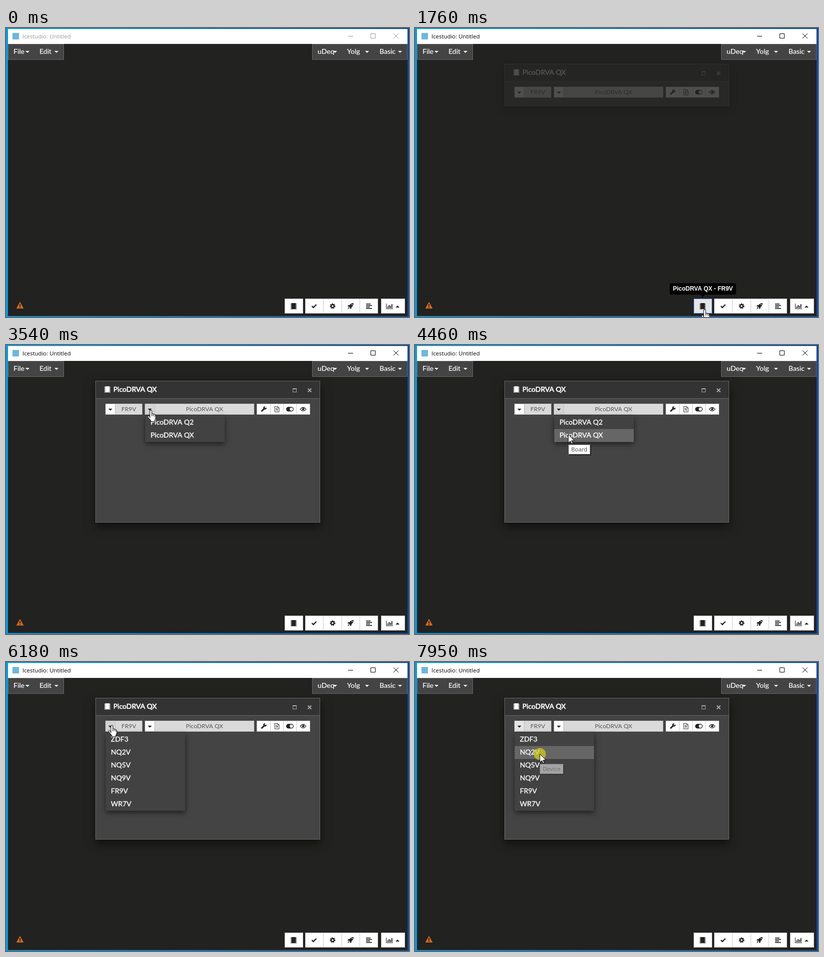
Write an HTML page with a canvas that moves like this. It is 807 px wide and 581 px high and loops after 8000 ms.

```html
<!DOCTYPE html>
<html lang="en">
<head>
<meta charset="utf-8">
<title>Icestudio</title>
<style>
html, body { margin: 0; width: 100%; height: 100%; overflow: hidden; background: #222; }
canvas { display: block; }
</style>
</head>
<body>
<canvas id="stage" width="807" height="581"></canvas>
<script>
const LOOP = 8000, STEP = 77.3, START = 440;
const BOARD = 'PicoDRVA QX', DEVICE = 'FR9V';
const BOARDS = ['PicoDRVA Q2', BOARD];
const DEVICES = ['ZDF3', 'NQ2V', 'NQ5V', 'NQ9V', DEVICE, 'WR7V'];
const LATO = 'Lato, sans-serif', UI = '"Open Sans", sans-serif';

const screen = document.getElementById('stage').getContext('2d');
const layerCanvas = document.createElement('canvas');
layerCanvas.width = 807;
layerCanvas.height = 581;
const layer = layerCanvas.getContext('2d');
let c = screen;

// Pointer stops: time, x, y
const STOPS = [
  [440, 703, 284], [1210, 580, 566], [2150, 580, 566], [2990, 290, 122],
  [3070, 290, 122], [3220, 290, 131], [3850, 290, 131], [4230, 307, 180],
  [5320, 307, 180], [5390, 303, 165], [5790, 212, 127], [6190, 212, 127],
  [6870, 245, 221], [7110, 245, 221], [7640, 250, 185]
];
const HAND = new Path2D('M-2 15V2Q-2 0 0 0T2 2V7.5Q3.5 6.5 5 8Q7 7.5 8 9Q10 9 10 11V15Q10 17 8 20V23H0V21Q-3 17.5-6 13.5Q-7 11-5 11Q-3.5 11-2 13.5Z');
const KNUCKLES = new Path2D('M2 8V12M5 8.5V12M8 10V13');
const ARROW = new Path2D('M0 0V17L4 13.2 6.6 19 9 18 6.4 12.3H12Z');

const within = (t, a, b) => t >= a && t < b;
const clamp = v => Math.max(0, Math.min(1, v));

function box(x, y, w, h, fill, stroke) {
  c.fillStyle = fill;
  c.fillRect(x, y, w, h);
  if (stroke) {
    c.strokeStyle = stroke;
    c.lineWidth = 1;
    c.strokeRect(x + .5, y + .5, w - 1, h - 1);
  }
}

function shadowBox(x, y, w, h, fill, blur, drop) {
  c.save();
  c.shadowColor = 'rgba(0,0,0,.55)';
  c.shadowBlur = blur;
  c.shadowOffsetY = drop;
  box(x, y, w, h, fill);
  c.restore();
}

function text(str, x, y, font, color, { align = 'left', weight = 0 } = {}) {
  c.font = font;
  c.textAlign = align;
  c.fillStyle = c.strokeStyle = color;
  c.fillText(str, x, y);
  if (weight) {
    c.lineWidth = weight;
    c.strokeText(str, x, y);
  }
}

function poly(color, ...p) {
  c.fillStyle = color;
  c.beginPath();
  for (let i = 0; i < p.length; i += 2) c.lineTo(p[i], p[i + 1]);
  c.fill();
}

function caret(x, y, color, dir = 1) {
  poly(color, x - 4, y - 2 * dir, x + 4, y - 2 * dir, x, y + 2 * dir);
}

function line(d, color, width = 1) {
  c.strokeStyle = color;
  c.lineWidth = width;
  c.stroke(new Path2D(d));
}

function disc(x, y, r, color) {
  c.fillStyle = color;
  c.beginPath();
  c.arc(x, y, r, 0, 7);
  c.fill();
}

function at(x, y, draw) {
  c.save();
  c.translate(x, y);
  draw();
  c.restore();
}

const icons = {
  chip(color = '#222') {
    box(-4, -6, 8, 12, color);
    for (let y = -5; y < 6; y += 2.5) box(-6, y, 12, 1.3, color);
  },
  check() { line('M-4.5 0L-1.5 3L4.5-3', '#222', 2.4); },
  gear() {
    c.setLineDash([2, 1.93]);
    line('M4.6 0A4.6 4.6 0 1 1-4.6 0A4.6 4.6 0 1 1 4.6 0', '#222', 2);
    c.setLineDash([]);
    line('M3 0A3 3 0 1 1-3 0A3 3 0 1 1 3 0', '#222', 2.4);
  },
  rocket() {
    c.fillStyle = '#222';
    c.fill(new Path2D('M6-6Q1-6-2-2L-5-1.5-6 1-3 1.3-1 3.2-1 6 1.5 5 2 2Q6-1 6-6ZM-4 2L-6 6-2 4Z'));
    disc(3, -3, 1, '#fff');
  },
  lines() {
    [9, 12, 8, 12].forEach((w, i) => box(-6, -5 + i * 3, w, 1.7, '#222'));
  },
  chart() {
    line('M-6.5-5V5.5H7', '#222');
    [3, 6, 4.5, 8].forEach((h, i) => box(-4.5 + i * 2.8, 4 - h, 1.8, h, '#222'));
  },
  wrench() {
    line('M-4.5 4.5L1.5-1.5', '#222', 3);
    disc(2.5, -2.5, 3.3, '#222');
    poly('#fff', 2, -2, 3.2, -6.5, 6.5, -3.2);
  },
  doc() {
    line('M-4.5-5.5H1.5L4.5-2.5V5.5H-4.5ZM1.5-5.5V-2.5H4.5M-2.5 0H2.5M-2.5 2H2.5M-2.5-2H0', '#333');
  },
  toggle() {
    line('M-3 0H3', '#222', 9);
    disc(-3, 0, 4.5, '#222');
    disc(3, 0, 4.5, '#222');
    disc(3, 0, 3.2, '#fff');
  },
  eye() {
    line('M-6 0Q0-7.5 6 0Q0 7.5-6 0Z', '#222', 1.2);
    disc(0, -.5, 2.6, '#222');
    disc(-.7, -1.2, .8, '#fff');
  }
};

function drawWindow(t) {
  const focused = t >= 1290;
  const sky = c.createLinearGradient(0, 0, 807, 0);
  sky.addColorStop(0, '#009be2');
  sky.addColorStop(.5, '#0878c8');
  sky.addColorStop(1, '#0b4ba0');
  box(0, 0, 807, 581, sky);
  box(4, 2, 800, 577, '#222221');
  box(4, 2, 800, 30, '#fff');
  box(13, 10, 13, 13, '#6fb7dc');
  const ink = focused ? '#000' : '#999';
  text('Icestudio: Untitled', 33, 21, '11.4px ' + UI, ink);
  line('M685 16.5H695M730.5 11.5H739.5V20.5H730.5ZM776 11L786 21M786 11L776 21', ink);

  box(4, 32, 112, 32, '#444', '#666');
  box(613, 32, 191, 32, '#444', '#666');
  [['File', 15, 43], ['Edit', 67, 101], ['uDeq', 624, 659], ['Yolg', 683, 723], ['Basic', 748, 789]]
    .forEach(([label, x, cx]) => {
      text(label, x, 52, '14px ' + LATO, '#fff', { weight: .2 });
      caret(cx, 48, '#fff');
    });

  c.lineJoin = 'round';
  poly('#d2691e', 28, 551, 35, 564, 21, 564);
  line('M28 551.5L34.5 563.5H21.5Z', '#d2691e');
  box(27, 555, 2, 4.5, '#222');
  box(27, 560.5, 2, 2, '#222');
  c.lineJoin = 'miter';

  const active = within(t, 1130, 3450);
  box(558, 544, 37, 30, active && (focused || t < 2220) ? '#e6e6e6' : '#fff', within(t, 1290, 3450) ? '#4a80d8' : '#ccc');
  box(599, 544, 146, 30, '#fff', '#ccc');
  line('M635.5 544V574M672.5 544V574M708.5 544V574', '#ccc');
  box(751, 544, 48, 30, '#fff', '#ccc');
  [['chip', 576], ['check', 617], ['gear', 654], ['rocket', 690], ['lines', 727], ['chart', 768]]
    .forEach(([name, x]) => at(x, 559, () => icons[name]()));
  caret(784, 560, '#222', -1);
}

function drawMenu(items, x, pointer) {
  shadowBox(x, 142, 159, items.length * 26 + 1, '#424242', 10, 4);
  items.forEach((label, i) => {
    const y = 143 + i * 26;
    if (pointer.y >= y && pointer.y < y + 26) box(x, y, 159, 26, '#666');
    text(label, x + 10.5, y + 17, '14px ' + LATO, '#fff', { weight: .35 });
  });
}

function drawPanel(t, pointer) {
  const boardOpen = within(t, 3540 - 90, 5010), deviceOpen = t >= 6180;
  const height = boardOpen || deviceOpen ? 285 : 85;
  shadowBox(179, 72, 450, height, '#444', 18, 8);
  box(179, 72, 450, height, '#444', '#666');
  box(180, 73, 448, 34, '#333');
  box(180, 107, 448, 1, '#666');
  at(203, 89, () => icons.chip('#fff'));
  text(BOARD, 215, 94, '14px ' + LATO, '#fff', { weight: .7 });
  box(574, 87, 8, 8, '#333', '#aaa');
  box(574, 87, 8, 2, '#aaa');
  line('M604.5 87.5L611.5 94.5M611.5 87.5L604.5 94.5', '#aaa', 2);

  const button = (x, open) => {
    const hover = within(pointer.y, 118, 140) && within(pointer.x, x, x + 20);
    box(x, 118, 20, 22, open ? '#d4d4d4' : hover ? '#e6e6e6' : '#fff', '#ccc');
    caret(x + 10, 130, '#222');
  };
  button(199, within(t, 6110, 7870));
  if (t >= 7870) {
    box(199, 118, 20, 22, '#e6e6e6', '#ccc');
    caret(209, 130, '#222');
  }
  button(278, within(t, 3450, 4860));
  box(219, 118, 54, 22, '#dadada', '#ccc');
  box(298, 118, 199, 22, '#dadada', '#ccc');
  text(DEVICE, 246, 133, '12px ' + LATO, '#555', { align: 'center' });
  text(BOARD, 397.5, 133, '12px ' + LATO, '#555', { align: 'center' });
  box(502, 118, 107, 22, '#fff', '#ccc');
  line('M529.5 118V140M555.5 118V140M581.5 118V140', '#ccc');
  [['wrench', 516], ['doc', 542.5], ['toggle', 568.5], ['eye', 595]]
    .forEach(([name, x]) => at(x, 129, () => icons[name]()));

  if (boardOpen) drawMenu(BOARDS, 279, pointer);
  if (deviceOpen) drawMenu(DEVICES, 199.5, pointer);
}

function drawChipTip() {
  c.fillStyle = 'rgba(0,0,0,.9)';
  c.beginPath();
  c.roundRect(510, 513, 133, 23, 4);
  c.fill();
  poly('rgba(0,0,0,.9)', 571, 536, 581, 536, 576, 541);
  text(`${BOARD} - ${DEVICE}`, 576.5, 528, 'bold 12px "Liberation Sans", sans-serif', '#fff', { align: 'center' });
}

function drawHint(label, w, { x, y }, alpha) {
  c.save();
  c.globalAlpha = alpha;
  box(x + 2, y + 22, w, 20, 'rgba(0,0,0,.4)');
  box(x, y + 20, w, 20, '#fff', '#767676');
  text(label, x + w / 2, y + 34, '11.5px ' + UI, '#444', { align: 'center' });
  c.restore();
}

function pointerAt(t) {
  const time = START + Math.floor((t - START + 5) / STEP) * STEP;
  const next = STOPS.findIndex(s => s[0] > time);
  if (next < 0) return { x: 250, y: 185 };
  if (next === 0) return { x: 703, y: 284 };
  const [t0, x0, y0] = STOPS[next - 1], [t1, x1, y1] = STOPS[next];
  const p = (time - t0) / (t1 - t0), k = p * p * (3 - 2 * p);
  return { x: Math.round(x0 + (x1 - x0) * k), y: Math.round(y0 + (y1 - y0) * k) };
}

function drawPointer(t, { x, y }) {
  const clicked = within(t, 1290, 1510) || within(t, 3450, 3540) || within(t, 4860, 5010) ||
    within(t, 6110, 6180) || t >= 7870;
  if (clicked) disc(x, y, 12, 'rgba(210,205,30,.75)');
  const overChip = within(x, 558, 595) && within(y, 544, 574);
  const overCaret = within(y, 118, 140) && (within(x, 199, 219) || within(x, 278, 298));
  const hand = overChip || overCaret;
  at(x, y, () => {
    const shape = hand ? HAND : ARROW;
    c.fillStyle = '#fff';
    c.strokeStyle = '#000';
    c.lineWidth = 1;
    c.fill(shape);
    c.stroke(shape);
    if (hand) c.stroke(KNUCKLES);
  });
}

function draw(t) {
  const pointer = pointerAt(t);
  drawWindow(t);
  if (t >= 1760) {
    c = layer;
    c.clearRect(0, 0, 807, 581);
    drawPanel(t, pointer);
    c = screen;
    c.globalAlpha = clamp((t - 1705) / 285);
    c.drawImage(layerCanvas, 0, 0);
    c.globalAlpha = 1;
  }
  if (within(t, 1130, 2220)) drawChipTip();
  if (within(t, 4460, 5010)) drawHint('Board', 44, pointer, t < 4940 ? 1 : .5);
  if (within(t, 7100, 7180)) drawHint('Device', 47, pointer, 1);
  if (t >= 7720) drawHint('Device', 47, pointer, t < 7950 ? 1 : .55);
  if (t >= START) drawPointer(t, pointer);
}

const begin = performance.now();
(function tick() {
  draw((performance.now() - begin) % LOOP);
  requestAnimationFrame(tick);
})();
</script>
</body>
</html>
```
